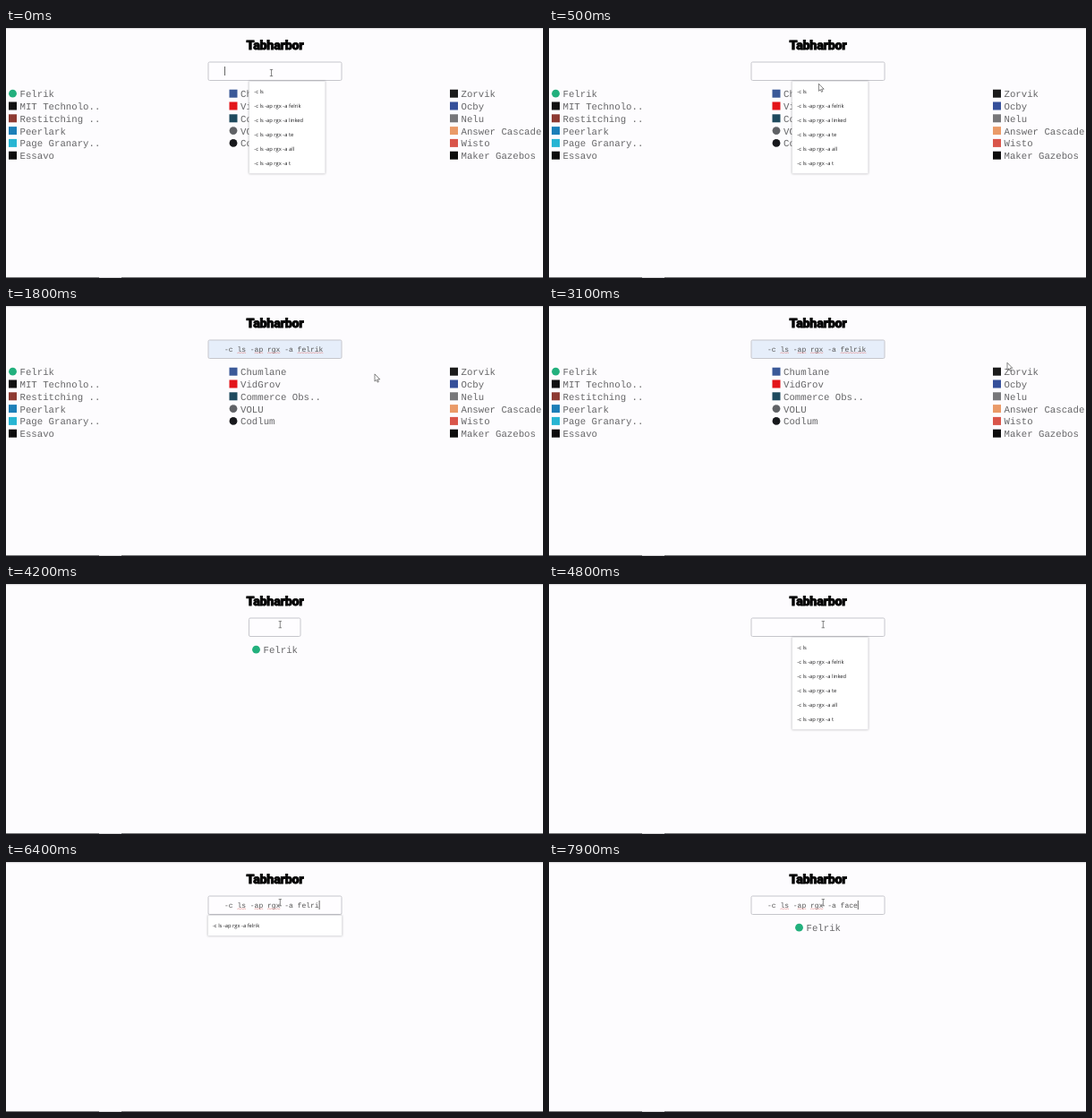
An HTML page that plays this animation: 600 by 279 pixels, repeating every 8000 ms.

```html
<!DOCTYPE html>
<html lang="en">
<head>
<meta charset="utf-8">
<title>Command start page</title>
<style>
  html, body { margin: 0; width: 100%; height: 100%; overflow: hidden; background: #fdfcfe; }
  svg { display: block; width: 100%; height: 100%; }
  text { white-space: pre; text-rendering: geometricPrecision; }
  .title { font: 900 14.3px Roboto, sans-serif; letter-spacing: -.25px; text-anchor: middle; stroke: #000; stroke-width: .8px; }
  .link { font: 10.7px "Liberation Mono", monospace; fill: #666668; }
  .typed { font: 8px "Liberation Mono", monospace; fill: #555; }
  .hint { font: 500 5.8px "Open Sans", sans-serif; fill: #1c1c1e; }
  .menu { fill: #fff; stroke: #e6e6ea; stroke-width: .5px; filter: drop-shadow(0 .8px .8px rgba(0, 0, 0, .28)); }
</style>
</head>
<body>
<svg id="stage" viewBox="0 0 600 279"></svg>
<script>
const LOOP = 8000, STEP = 100;
const NAME = 'felrik';
const PREFIX = '-c ls -ap rgx -a ';
const FULL = PREFIX + NAME;
const HINTS = ['-c ls', FULL, ...['linked', 'te', 'all', 't'].map(s => PREFIX + s)];
const CHAR = 4.8;
const WIDE = { x: 226, w: 149 }, NARROW = { x: 271.5, w: 57.5 };

// [label, colour, round]
const COLUMNS = [
  [3, [['Felrik', '#22b07d', 1], ['MIT Technolo..', '#111'], ['Restitching ..', '#8e3a32'],
    ['Peerlark', '#1c7fb8'], ['Page Granary..', '#27b5d3'], ['Essavo', '#0c0c0c']]],
  [249.5, [['Chumlane', '#3b5998'], ['VidGrov', '#e3151a'], ['Commerce Obs..', '#1f4a5e'],
    ['VOLU', '#606266', 1], ['Codlum', '#17181c', 1]]],
  [496, [['Zorvik', '#1b1b1b'], ['Ocby', '#35509a'], ['Nelu', '#77777a'],
    ['Answer Cascade', '#ea9a68'], ['Wisto', '#d9554a'], ['Maker Gazebos', '#0c0c0c']]]
];

const stage = document.getElementById('stage');

function el(tag, attrs, parent = stage, text) {
  const node = document.createElementNS('http://www.w3.org/2000/svg', tag);
  set(node, attrs);
  if (text !== undefined) node.textContent = text;
  parent.appendChild(node);
  return node;
}
function set(node, attrs) {
  for (const key in attrs) node.setAttribute(key, attrs[key]);
}
function show(node, on) {
  node.setAttribute('visibility', on ? 'visible' : 'hidden');
}
function addLink(parent, x, y, [label, fill, round]) {
  if (round) el('circle', { cx: x + 4.5, cy: y, r: 4.4, fill }, parent);
  else el('rect', { x, y: y - 4.5, width: 9, height: 9, fill }, parent);
  el('text', { class: 'link', x: x + 12.5, y: y + 3.9 }, parent, label);
}

// Page
el('rect', { width: 600, height: 279, fill: '#fdfcfe' });
el('rect', { width: 600, height: 1.2, fill: '#dedde0' });
el('rect', { y: 278, width: 600, height: 1, fill: '#77777a' });
el('rect', { x: 104, y: 278, width: 25, height: 1, fill: '#d6d6d8' });
el('text', { class: 'title', x: 300.5, y: 24.3 }, stage, 'Tabharbor');

const grid = el('g');
COLUMNS.forEach(([x, links]) => links.forEach((link, i) => addLink(grid, x, 73.2 + i * 13.8, link)));
const result = el('g');
addLink(result, 275, 73.2, COLUMNS[0][1][0]);

// Input field
const field = el('rect', { y: 38, height: 20.5, rx: 1.5, stroke: '#c6c6cc', 'stroke-width': 1 });
const preview = el('text', { class: 'hint', x: 244.5, y: 50.3 });
const typed = el('text', { class: 'typed', x: 244, y: 50.7 });
const marks = el('path', { fill: 'none', stroke: '#e2706c', 'stroke-width': .5 });
const caret = el('rect', { y: 43, width: 1, height: 10, fill: '#666' });

// Suggestion menus
const menu = el('g');
el('rect', { class: 'menu', x: 271.8, y: 59.5, width: 84.8, height: 102.8 }, menu);
const bar = el('rect', { x: 272, width: 84.4, height: 16, fill: '#e8e8ea' }, menu);
HINTS.forEach((hint, i) => el('text', { class: 'hint', x: 277.3, y: 73 + i * 16 }, menu, hint));

const single = el('g');
el('rect', { class: 'menu', x: 225.8, y: 59.8, width: 149.4, height: 22.4 }, single);
el('text', { class: 'hint', x: 231, y: 73 }, single, FULL);

// Mouse
const arrow = el('path', { d: 'M0 0V8.2L1.9 6.5 3.1 9.2 4.4 8.6 3.2 6H5.8Z', fill: '#fff', stroke: '#333', 'stroke-width': .6 });
const beam = el('path', { d: 'M-1.7-3.6H1.7M0-3.6V3.6M-1.7 3.6H1.7', fill: 'none', stroke: '#555', 'stroke-width': .7 });

const mix = (a, b, p) => a + (b - a) * p;
const ramp = (t, from, to) => Math.min(1, Math.max(0, (t - from) / (to - from)));
const smooth = p => p * p * (3 - 2 * p);
const within = (t, from, to) => t >= from && t < to;

// [start, end, x, y]
const MOVES = [[200, 1000, 312, 88.5], [1400, 2200, 512, 63.3], [3400, 4200, 306.3, 45.2]];
function mouseAt(t) {
  let x = 296.5, y = 50;
  for (const [from, to, nx, ny] of MOVES) {
    const p = smooth(ramp(t, from, to));
    x = mix(x, nx, p);
    y = mix(y, ny, p);
  }
  return { x, y };
}

// [time, typed text]
const TYPING = [[0, ''], [1500, FULL], [3500, ''], [6000, FULL],
  [6400, FULL.slice(0, -1)], [6700, FULL.slice(0, -2)], [7000, FULL.slice(0, -3)],
  [7100, FULL.slice(0, -4)], [7200, PREFIX + 'f'],
  [7600, PREFIX + 'fa'], [7800, PREFIX + 'fac'], [7900, PREFIX + 'face']];
const CARET_ON = [[0, 100], [1900, 2400], [4300, 4800], [6000, LOOP]];

function wave(from, count) {
  let d = `M${244 + from * CHAR} 52.6`;
  for (let i = 0; i < count * 3; i++) d += `l${CHAR / 3} ${i % 2 ? .7 : -.7}`;
  return d;
}

function draw(t) {
  const mouse = mouseAt(t);
  const text = TYPING.filter(([at]) => at <= t).pop()[1];

  const open = t < 1500 || within(t, 4300, 6000);
  let pick = -1;
  if (t < 1500 && mouse.y > 63) pick = Math.floor((mouse.y - 63) / 16);
  if (within(t, 5100, 6000)) pick = t < 5300 ? 0 : 1;
  show(menu, open);
  show(bar, open && pick >= 0);
  set(bar, { y: 63 + Math.max(pick, 0) * 16 });
  show(single, within(t, 6400, 7600));

  show(grid, t < 3500);
  show(result, t >= 3500);

  const shrink = smooth(ramp(t, 3400, 3900)) - smooth(ramp(t, 4300, 4800));
  const x = mix(WIDE.x, NARROW.x, shrink);
  const filled = pick >= 0 || text === FULL;
  set(field, { x, width: mix(WIDE.w, NARROW.w, shrink), fill: filled ? '#e6eefa' : '#fefdff' });

  preview.textContent = pick >= 0 ? HINTS[pick] : '';
  typed.textContent = text;
  set(marks, { d: text ? wave(3, 2) + wave(7, 2) + wave(10, 3) + (t < 3500 ? wave(17, 6) : '') : '' });
  set(caret, { x: x + 18 + text.length * CHAR });
  show(caret, pick < 0 && CARET_ON.some(([from, to]) => within(t, from, to)));

  const inField = mouse.y < 59 && mouse.x > x && mouse.x < 375;
  const at = { transform: `translate(${mouse.x} ${mouse.y})` };
  set(arrow, at);
  set(beam, at);
  show(arrow, !inField);
  show(beam, inField);
}

const start = performance.now();
function tick() {
  const t = (performance.now() - start) % LOOP;
  draw(Math.floor(t / STEP) * STEP);
  requestAnimationFrame(tick);
}
tick();
</script>
</body>
</html>
```
